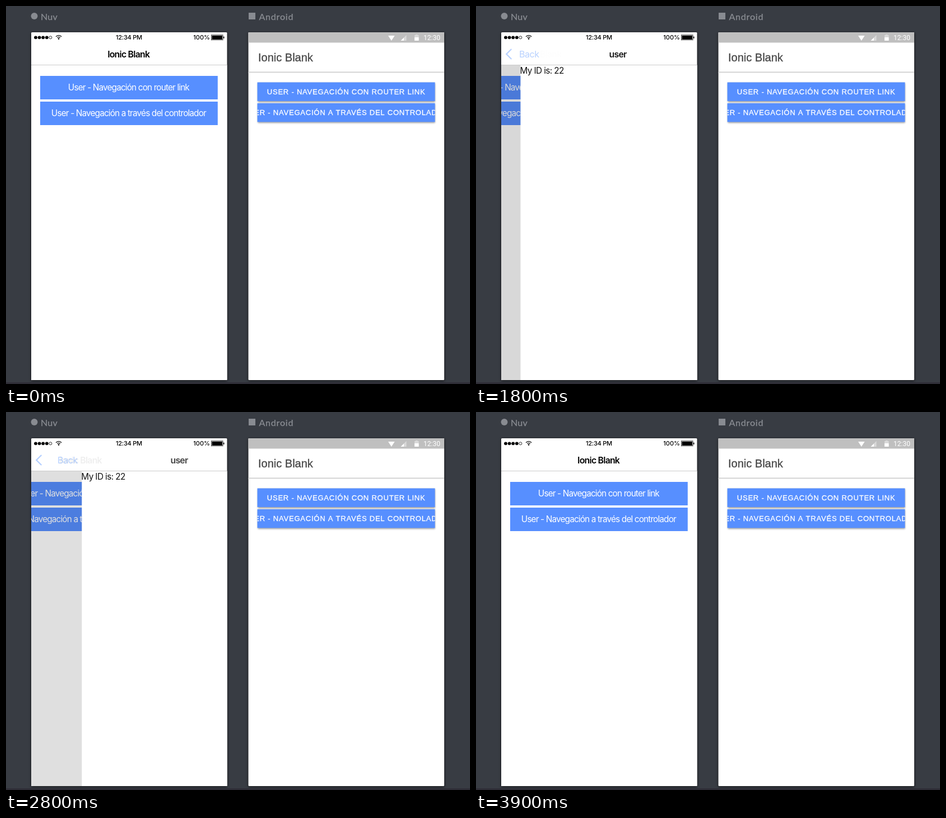
These frames come from a looping animation (828 px wide and 676 px high, 4 s). An HTML page with a canvas:

```html
<!DOCTYPE html>
<html lang="es">
<head>
<meta charset="utf-8">
<title>Navegación</title>
<style>
  html, body { margin: 0; width: 100%; height: 100%; overflow: hidden; background: #383c43; }
  canvas { display: block; width: 828px; height: 676px; }
</style>
</head>
<body>
<canvas id="stage" width="828" height="676"></canvas>
<script>
const ctx = document.getElementById('stage').getContext('2d');
const LOOP = 4000, STEP = 100, SLIDE = 540;
const BLUE = '#578fff';
const INTER = 'Inter, sans-serif';
const ARIAL = '"Liberation Sans", Arial, sans-serif';
const LABEL = 'User - Navegación ';
const LINKS = [LABEL + 'con router link', LABEL + 'a través del controlador'];
const PHONE = { x: 45, y: 47, w: 349.5, h: 622 };

// Page transitions: start time and direction (1 opens the page, -1 goes back)
const SLIDES = [[1083, 1], [1773, -1], [2653, 1], [3380, -1]];

const clamp = v => Math.max(0, Math.min(1, v));
const pulse = (t, from, to) => clamp(Math.min((t - from) / 100 + 0.5, (to - t) / 100 + 0.5));

// cubic-bezier(0.36, 0.66, 0.04, 1)
function ease(x) {
  if (x <= 0) return 0;
  if (x >= 1) return 1;
  const curve = (a, b, s) => 3 * a * s * (1 - s) ** 2 + 3 * b * s * s * (1 - s) + s ** 3;
  let lo = 0, hi = 1;
  for (let i = 0; i < 24; i++) {
    const mid = (lo + hi) / 2;
    if (curve(0.36, 0.04, mid) < x) lo = mid; else hi = mid;
  }
  return curve(0.66, 1, lo);
}

function openAmount(t) {
  let open = 0;
  for (const [start, dir] of SLIDES) {
    if (t < start) break;
    const p = ease((t - start) / SLIDE);
    open = dir > 0 ? p : 1 - p;
  }
  return open;
}

function rect(x, y, w, h, color) {
  ctx.fillStyle = color;
  ctx.fillRect(x, y, w, h);
}

function poly(points, color) {
  ctx.fillStyle = color;
  ctx.beginPath();
  points.forEach(([x, y]) => ctx.lineTo(x, y));
  ctx.fill();
}

function circle(x, y, r, color, hollow) {
  ctx.beginPath();
  ctx.arc(x, y, r, 0, Math.PI * 2);
  ctx.fillStyle = ctx.strokeStyle = color;
  ctx.lineWidth = 0.8;
  hollow ? ctx.stroke() : ctx.fill();
}

function text(str, x, y, font, color, { spacing = 0, align = 'left', alpha = 1, bold = 0 } = {}) {
  if (alpha <= 0) return;
  ctx.save();
  ctx.globalAlpha *= alpha;
  ctx.font = font;
  ctx.letterSpacing = spacing + 'px';
  ctx.textAlign = align;
  ctx.fillStyle = ctx.strokeStyle = color;
  const px = align === 'center' ? x + spacing / 2 : x;
  ctx.fillText(str, px, y);
  if (bold) {
    ctx.lineWidth = bold;
    ctx.strokeText(str, px, y);
  }
  ctx.restore();
}

function clipped(x, y, w, h, draw) {
  ctx.save();
  ctx.beginPath();
  ctx.rect(x, y, w, h);
  ctx.clip();
  draw();
  ctx.restore();
}

function shadowed(blur, dy, color, draw) {
  ctx.save();
  ctx.shadowBlur = blur;
  ctx.shadowOffsetY = dy;
  ctx.shadowColor = color;
  draw();
  ctx.restore();
}

function backdrop() {
  rect(0, 0, 828, 676, '#383c43');
  rect(0, 673, 828, 3, '#2f2e37');
  circle(50.5, 18, 6, '#888b91');
  text('Nuv', 62, 24.5, '16px Lato, sans-serif', '#8b8e94', { spacing: 0.2, bold: 0.25 });
  rect(433, 12, 12, 12, '#888b91');
  text('Android', 451.5, 24.5, '16px Lato, sans-serif', '#8b8e94', { spacing: 0.8, bold: 0.25 });
  for (const x of [PHONE.x, 432.5]) {
    shadowed(4, 1, 'rgba(0,0,0,0.75)', () => {
      ctx.fillStyle = '#fff';
      ctx.beginPath();
      ctx.roundRect(x, PHONE.y, PHONE.w, PHONE.h, 1.5);
      ctx.fill();
    });
  }
}

function leftStatus() {
  for (let i = 0; i < 5; i++) circle(53 + i * 6.6, 56.3, i < 4 ? 2.9 : 2.5, '#000', i === 4);
  ctx.strokeStyle = '#000';
  ctx.lineWidth = 1.3;
  for (const r of [3.6, 6.6]) {
    ctx.beginPath();
    ctx.arc(94, 59.2, r, -Math.PI * 0.77, -Math.PI * 0.23);
    ctx.stroke();
  }
  circle(94, 58.6, 1.3, '#000');
  const font = '500 11px ' + INTER;
  text('12:34 PM', 219.5, 60, font, '#000', { spacing: -0.25, align: 'center' });
  text('100%', 364, 60, font, '#000', { align: 'right' });
  ctx.strokeStyle = '#000';
  ctx.lineWidth = 0.7;
  ctx.strokeRect(366.5, 51.8, 20.6, 9);
  rect(367.5, 52.8, 18.6, 7, '#000');
  rect(388, 54.6, 1.4, 3.4, '#000');
}

function homePage(t) {
  const hover = [pulse(t, 600, 1150), pulse(t, 2400, 2700)];
  rect(45, 106, 349.5, 563, '#fff');
  LINKS.forEach((label, i) => {
    const y = 125 + i * 46;
    rect(61, y, 316.8, 42, BLUE);
    rect(61, y, 316.8, 42, `rgba(255,255,255,${0.1 * hover[i]})`);
    text(label, 219.3, y + 26.4, '15.3px ' + INTER, '#fff', { spacing: -0.83, align: 'center' });
  });
}

function leftPhone(t) {
  const open = openAmount(t), rest = 1 - open;
  const pageX = rest * 350, homeX = -open * 115;

  clipped(PHONE.x, 106, PHONE.w, 563, () => {
    ctx.save();
    ctx.translate(homeX, 0);
    homePage(t);
    ctx.restore();
    rect(45 + homeX + 349.5, 106, 120, 563, '#fff');
    rect(45, 106, 350, 563, `rgba(0,0,0,${0.17 * open})`);
    if (open > 0) {
      rect(45 + pageX, 106, 350, 563, '#fff');
      text('My ID is: 22', 44 + pageX, 121, '15.3px ' + INTER, '#111', { spacing: -0.58 });
    }
  });

  clipped(PHONE.x, 47, PHONE.w, 60, () => {
    const title = '600 15.8px ' + INTER;
    const style = { spacing: -0.75, align: 'center' };
    text('Ionic Blank', 219 + homeX, 91.8, title, '#000', { ...style, alpha: rest * rest });
    text('user', 219 + pageX, 91.8, title, '#000', { ...style, alpha: open });

    const pressed = Math.max(pulse(t, 1650, 1900), pulse(t, 3100, 3450));
    const alpha = open ** 3 * (1 - 0.48 * pressed);
    text('Back', 67.6 + 95 * rest, 91.8, '16px ' + INTER, '#488aff', { spacing: -0.4, alpha });
    ctx.globalAlpha = alpha;
    ctx.strokeStyle = '#488aff';
    ctx.lineWidth = 2.3;
    ctx.beginPath();
    ctx.moveTo(63.3, 77);
    ctx.lineTo(54.3, 86);
    ctx.lineTo(63.3, 95);
    ctx.stroke();
  });
  rect(45, 105, 349.5, 1, '#cbcbcb');
  leftStatus();
}

function rightPhone() {
  rect(432.5, 47, 349.5, 18.5, '#bfbfbf');
  poly([[682, 53], [693.6, 53], [687.8, 62]], '#fff');
  poly([[704.5, 62], [714.5, 52], [714.5, 62]], '#d9d9d9');
  poly([[704.5, 62], [710, 56.5], [710, 62]], '#fff');
  rect(731, 51, 3.6, 2, '#dcdcdc');
  rect(729, 52, 7.6, 4, '#d9d9d9');
  rect(729, 56, 7.6, 6, '#fff');
  text('12:30', 745, 61, '12px Roboto, sans-serif', '#fff');

  text('Ionic Blank', 450, 99.3, '20px ' + ARIAL, '#484848', { bold: 0.35 });
  rect(432.5, 117.5, 349.5, 1.5, '#d0d0d0');
  rect(432.5, 119, 349.5, 1, '#efefef');

  LINKS.forEach((label, i) => {
    const y = 136.5 + i * 37.4;
    shadowed(3, 1.5, 'rgba(0,0,0,0.4)', () => rect(448.5, y, 317, 33.5, BLUE));
    clipped(448.5, y, 317, 33.5, () => {
      text(label.toUpperCase(), 606.7, y + 21.2, '13px ' + ARIAL, '#fff',
        { spacing: 0.78, align: 'center', bold: 0.3 });
    });
  });
}

function frame() {
  const t = Math.floor((performance.now() % LOOP) / STEP) * STEP;
  backdrop();
  leftPhone(t);
  rightPhone();
  requestAnimationFrame(frame);
}
frame();
</script>
</body>
</html>
```
